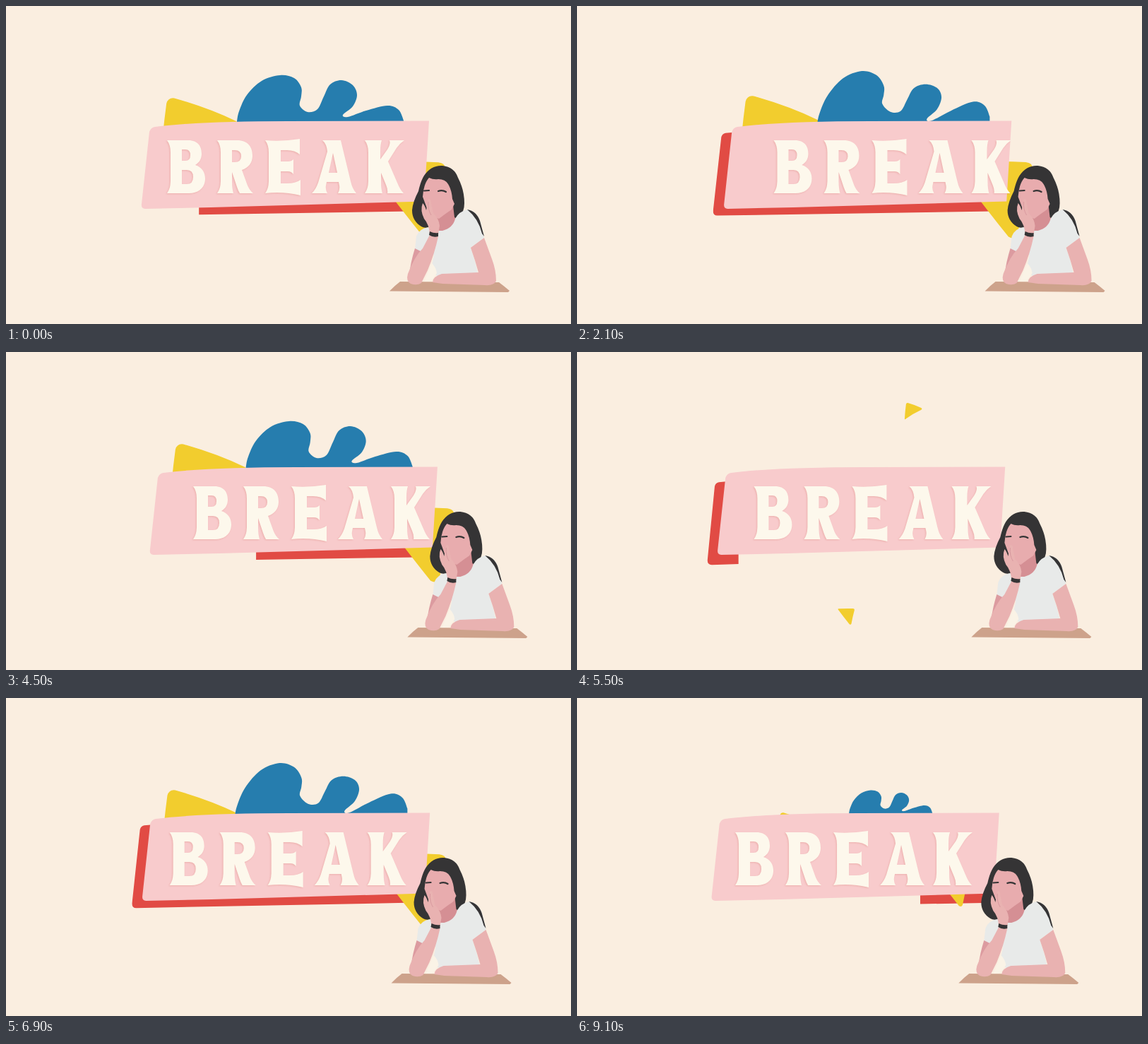
These frames come from a looping animation (800x450 px, 9200 ms). An HTML page:

```html
<!DOCTYPE html>
<html lang="en">
<head>
<meta charset="utf-8">
<title>Break</title>
<style>
  html, body { margin: 0; width: 100%; height: 100%; overflow: hidden; background: #faeee0; }
  svg { display: block; width: 100vw; height: 100vh; }
  #word { filter: drop-shadow(-1px 1px 1.2px rgba(222, 140, 132, .42)); }
  #word text { font: bold 100px "DejaVu Sans Mono", monospace; fill: transparent; }
</style>
</head>
<body>
<svg viewBox="0 0 800 450">
  <defs>
    <clipPath id="wipe"><rect id="wipeBox" y="100" height="260"/></clipPath>
  </defs>
  <rect width="800" height="450" fill="#faeee0"/>

  <g id="red"><g clip-path="url(#wipe)">
    <path id="slab" fill="#e14b44" d="M194 182L215 180L595 175L590 287L184 299Q177 299 178 291L188 188Q189 183 194 182Z"/>
  </g></g>

  <g fill="#f2cd2e">
    <path id="upper" d="M-38-37Q-36-44-29-43Q10-32 41-17Q49-12 42-7Q0 12-43 43Q-46 45-45.5 41Q-43 0-38-37Z"/>
    <path id="lower" d="M-43-38Q-45-42-38-41Q0-44 36-42Q45-41 43-33Q34 0 27 37Q24 44 17 40Q-12 4-43-38Z"/>
  </g>

  <path id="blue" fill="#267dae"/>

  <path id="pink" fill="#f8cbcc" d="M211 171Q275 163 400 163L599 162.5L592 276.500L290 285L197 287Q191 287 192 280L203 178Q205 172 211 171Z"/>

  <g id="word" fill="#fdf8ec" fill-rule="evenodd">
    <path d="M228 190H258C272 190 277 199 277 209C277 217 273 222 268 225C277 228 282 235 282 244C282 257 273 265 259 265H228Q233 258 233 248V207Q233 197 228 190Z
      M249 203V219H254Q261 219 261 211Q261 203 254 203Z M249 232V252H256Q265 252 265 242Q265 232 256 232Z"/>
    <path d="M299 190H327C343 190 349 200 349 212C349 222 343 229 334 232L342 254Q345 261 350 265H331Q329 262 327 256L320 235V248Q320 258 322 265H299Q304 258 304 248V207Q304 197 299 190Z
      M320 204V221H324Q333 221 333 212.500Q333 204 324 204Z"/>
    <path d="M367 190Q391 192 416 188V210Q409 204 398 204H389V220H399Q404 220 407 217V238Q404 234 399 234H389V251H398Q410 251 417 246V268Q392 262 367 265Q372 258 372 248V207Q372 197 367 190Z"/>
    <path d="M448 190H474L488 248Q490 258 496 265H470Q473 260 472 254L471 249H454L453 254Q452 260 455 265H433Q439 259 442 250L455 206Q454 195 448 190Z
      M463 208L457 236H469Z"/>
    <path d="M508 190H532Q530 196 530 206V217L540 203Q545 195 543 190H564Q558 194 553 201L541 220L554 250Q558 260 563 265H540Q541 260 538 253L531 236V248Q531 259 533 265H508Q513 258 513 248V207Q513 197 508 190Z"/>
    <text x="226 296 364 433 508" y="264">BREAK</text>
  </g>

  <g id="woman">
    <path fill="#cda28b" d="M558 390L698 391Q706 397 713 403L711 405L543 403.500Q550 396 558 390Z"/>
    <!-- hair -->
    <path fill="#353435" d="M592 240Q602 225 618 226Q635 228 640 243Q649 260 649 279Q649 293 641 297L628 306L600 313Q592 315 588 312Q575 304 575 289Q576 277 584 262Q587 248 592 240Z"/>
    <!-- neck and face -->
    <path fill="#d58f94" d="M606 296L633 282L635 299L641 303L632 316L613 321L606 316Z"/>
    <path fill="#e8acae" d="M590 270Q591 252 599 243Q605 246 612 245Q622 245 626 252Q631 260 632 273L635 280L631 288Q622 294 613 301L600 297Z"/>
    <path fill="none" stroke="#353435" stroke-width="2.200" stroke-linecap="round" d="M592 261.500L599 261M612 262Q618 260 623 263"/>
    <!-- shirt -->
    <path fill="#e8eae9" d="M598 313Q585 315 581 326L579 344L590 349L606 352L602 372L610 382L668 378L664 361L658 342L677 328L672 306Q666 289 653 288Q641 291 636 301Q633 314 618 318L607 318Z"/>
    <path fill="#353435" d="M653 288Q666 290 671 304L677 326L674 322Q669 301 653 288Z"/>
    <!-- far arm -->
    <path fill="#e9b2b1" d="M658 342L677 328L688 358Q694 374 694 389Q691 396 678 395L618 393L604 391Q604 383 617 379L669 377L664 360Z"/>
    <path fill="#faf3e6" d="M603 364Q609 370 610 378L602 389L592 390Z"/>
    <!-- propping arm -->
    <path fill="#dc9ba0" d="M579 343L591 349L584 365L571 380Q573 362 579 343Z"/>
    <path fill="#e9b2b1" d="M600 324L612 326Q607 350 597 374L588 392Q582 396 573 393Q566 389 569 379Q578 355 590 343Z"/>
    <path fill="#e9b2b1" d="M598 273Q602 272 602 279L605 293Q613 301 614 311L612 323L600 323Q599 309 592 301Q586 289 590 279Q593 282 595 289Z"/>
    <path fill="none" stroke="#d99aa0" stroke-width="1" d="M598 277Q597 288 602 296"/>
    <path fill="#353435" d="M600 319Q606 322 612 321L612 326Q605 328 599 324Z"/>
  </g>
</svg>
<script>
const LOOP = 9200, CYCLE = 4400, HEAD_START = 3450, STEP = 100;
const { PI, sin, cos, min, max, floor } = Math;
const el = id => document.getElementById(id);
const put = (id, value) => el(id).setAttribute('transform', value);

const part = (t, from, to) => max(0, min(1, (t - from) / (to - from)));
const ramp = (t, from, to) => { const u = part(t, from, to); return u * u * (3 - 2 * u); };
const easeOut = u => 1 - (1 - u) ** 2;
const backOut = (u, k = 2.3) => 1 + (k + 1) * (u - 1) ** 3 + k * (u - 1) ** 2;

// Sideways drift: quick out, slow return.
const pan = t => t < 2500
  ? 35.5 * easeOut(t / 2500)
  : 16.4 + 19.1 * cos(PI * part(t, 2500, 8300));

// Points along the splash, left to right.
const knots = [[327, 163], [330, 149], [341, 126], [362, 106], [388, 98], [408, 102], [418, 115], [418, 128],
  [416, 141], [427, 150], [441, 146], [450, 128], [459, 111], [475, 105], [491, 112], [497, 126],
  [491, 142], [477, 154], [484, 157], [510, 148], [540, 141], [556, 147], [563, 162]];

// The outer lobes rise and the middle one sinks as the wobble grows.
function splash(wobble) {
  const pts = knots.map(([x, y]) => [
    x + .035 * wobble * (x - 446),
    y - 6 * wobble * cos(2 * PI * (x - 387) / 165)
  ]);
  const end = pts.length - 1, at = i => pts[max(0, min(end, i))];
  let d = 'M' + pts[0];
  for (let i = 0; i < end; i++) {
    const [a, b, c, e] = [-1, 0, 1, 2].map(k => at(i + k));
    const c1 = b.map((v, k) => v + (c[k] - a[k]) / 6);
    const c2 = c.map((v, k) => v - (e[k] - b[k]) / 6);
    d += `C${c1} ${c2} ${c}`;
  }
  return d + `L${pts[end][0]} 174L${pts[0][0]} 174Z`;
}

function drawRed(age, x) {
  const shown = ramp(age, 0, 750), gone = ramp(age, 3190, 4020);
  put('red', `translate(${.45 * x} 0)`);
  put('slab', `translate(0 ${2.5 * (1 - shown)}) rotate(${.8 * sin(PI * age / 2300) ** 2} 360 240)`);
  el('wipeBox').setAttribute('x', 177 + 413 * gone);
  el('wipeBox').setAttribute('width', 430 * max(0, shown - gone));
}

// Two triangles swing round a shared centre, half a turn apart.
function drawYellow(age, x) {
  const gone = ramp(age, 3570, 3890);
  const swell = 1 + .035 * sin(PI * part(age, 350, 1550));
  const size = 1.25 * (ramp(age, 0, 500) - gone) * swell;
  const radius = 153 * (1 - .35 * gone) * swell;
  const turn = 117 * (1 - part(age, 50, 900)) ** 2 + 8 * gone;
  const angle = (163 + turn) * PI / 180;
  const dx = radius * cos(angle), dy = -radius * sin(angle);
  const swing = (id, side) =>
    put(id, `translate(${421 + .5 * x + side * dx} ${229 + side * dy}) scale(${size})`);
  const tilt = turn - 163;
  const a = tilt * PI / 180;
  const ox = radius * cos(a), oy = radius * sin(a);
  swing.call(null, 'upper', 1);
  put('upper', `translate(${421 + .5 * x + ox * 1} ${229 + oy}) scale(${size})`);
  put('lower', `translate(${421 + .5 * x - ox} ${229 - oy}) scale(${size})`);
}

function drawBlue(age, x) {
  const grown = age < 330 ? 0 : backOut(part(age, 330, 1030));
  const size = grown * (1 - ramp(age, 3550, 3950));
  el('blue').setAttribute('d', splash(1 - ramp(age, 1550, 3150)));
  put('blue', `translate(${446 + .5 * x} 163) scale(${size}) translate(-446 -163)`);
}

function draw(t) {
  const x = pan(t), age = (t + HEAD_START) % CYCLE;
  drawRed(age, x);
  drawYellow(age, x);
  drawBlue(age, x);
  put('pink', `translate(${.47 * x} 0)`);
  put('word', `translate(${1.46 * x} 0)`);
  put('woman', `translate(${x} 0)`);
}

function tick() {
  const t = floor((performance.now() + 5) / STEP) * STEP;
  draw(t % LOOP);
  requestAnimationFrame(tick);
}
tick();
</script>
</body>
</html>
```
